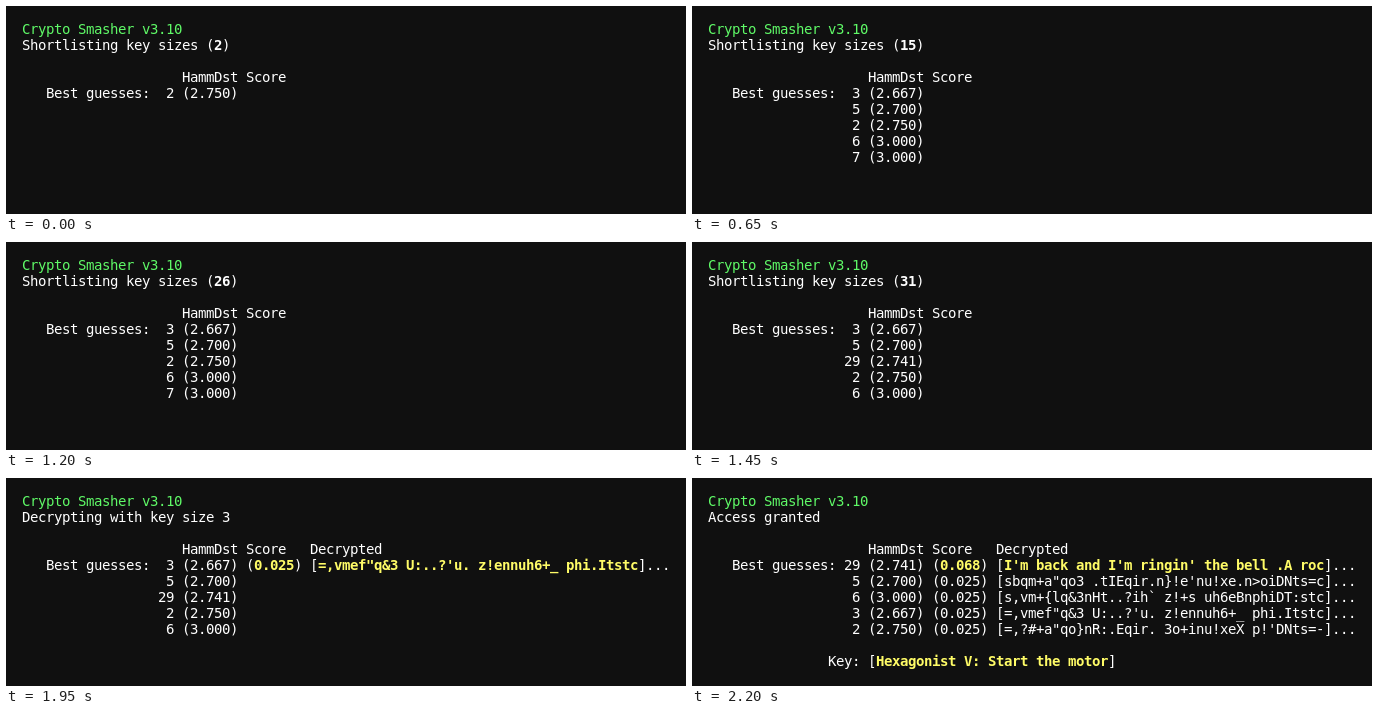
Recreate the animation shown at these times as an HTML page. Size 680 by 208 pixels, loop 7.2 s.

```html
<!DOCTYPE html>
<html lang="en">
<head>
<meta charset="utf-8">
<style>
  html, body { margin: 0; width: 100%; height: 100%; overflow: hidden; background: #101010; }
  pre {
    margin: 0; padding: 15px 16px; color: #fff;
    font: 14px/16px "DejaVu Sans Mono", monospace;
    letter-spacing: calc(8px - 1ch); /* terminal cells are 8px wide */
    font-variant-ligatures: none;
  }
  i { font-style: normal; color: #5ff967; }
  em { font-style: normal; font-weight: bold; color: #fffc67; }
</style>
</head>
<body>
<pre id="screen"></pre>
<script>
const LOOP = 7200, STEP = 50, LAST_SIZE = 40;
const screen = document.getElementById('screen');

// Key sizes that ever reach the shortlist; lower distance is better.
const keys = [
  { size: 2, dist: 2.75, score: 0.0250, text: `=,?#+a"qo}nR:.Eqir. 3o+inu!xeX p!'DNts=-` },
  { size: 3, dist: 2.667, score: 0.0252, text: `=,vmef"q&3 U:..?'u. z!ennuh6+_ phi.Itstc` },
  { size: 4, dist: 3.125 },
  { size: 5, dist: 2.7, score: 0.0254, text: `sbqm+a"qo3 .tIEqir.n}!e'nu!xe.n>oiDNts=c` },
  { size: 6, dist: 3, score: 0.0253, text: 's,vm+{lq&3nHt..?ih` z!+s uh6eBnphiDT:stc' },
  { size: 7, dist: 3 },
  { size: 29, dist: 2.741, score: 0.068, text: `I'm back and I'm ringin' the bell .A roc` },
];

const escape = s => s.replace(/&/g, '&amp;').replace(/</g, '&lt;');
const mark = (s, on) => on ? `<em>${s}</em>` : s;
const shortlist = max => keys.filter(k => k.size <= max)
  .sort((a, b) => a.dist - b.dist).slice(0, 5);

function row(key, i, tried) {
  let line = (i ? '' : '   Best guesses: ').padEnd(17) +
    `${String(key.size).padStart(2)} (${key.dist.toFixed(3)})`;
  if (i < tried)
    line += ` (${mark(key.score.toFixed(3), !i)}) [${mark(escape(key.text), !i)}]...`;
  return line;
}

function render(step) {
  const size = Math.min(step + 2, LAST_SIZE);
  const phase = step + 2 - LAST_SIZE;
  const tried = Math.max(0, Math.min(phase, 5));
  const list = shortlist(size);
  const ranked = list.slice(0, tried).sort((a, b) => b.score - a.score);
  const done = phase > 5;
  const status = done ? 'Access granted'
    : tried ? `Decrypting with key size ${list[tried - 1].size}`
    : `Shortlisting key sizes (<b>${size}</b>)`;
  const lines = [
    '<i>Crypto Smasher v3.10</i>',
    status,
    '',
    ' '.repeat(20) + 'HammDst Score' + (tried ? '   Decrypted' : ''),
    ...ranked.concat(list.slice(tried)).map((key, i) => row(key, i, tried)),
  ];
  if (done) lines.push('', ' '.repeat(15) + `Key: [${mark('Hexagonist V: Start the motor', true)}]`);
  screen.innerHTML = lines.join('\n');
}

let shown = -1;
const start = performance.now();
function tick() {
  const t = (performance.now() - start) % LOOP;
  const step = Math.min(Math.floor(t / STEP), 44);
  if (step !== shown) render(shown = step);
  requestAnimationFrame(tick);
}
tick();
</script>
</body>
</html>
```
